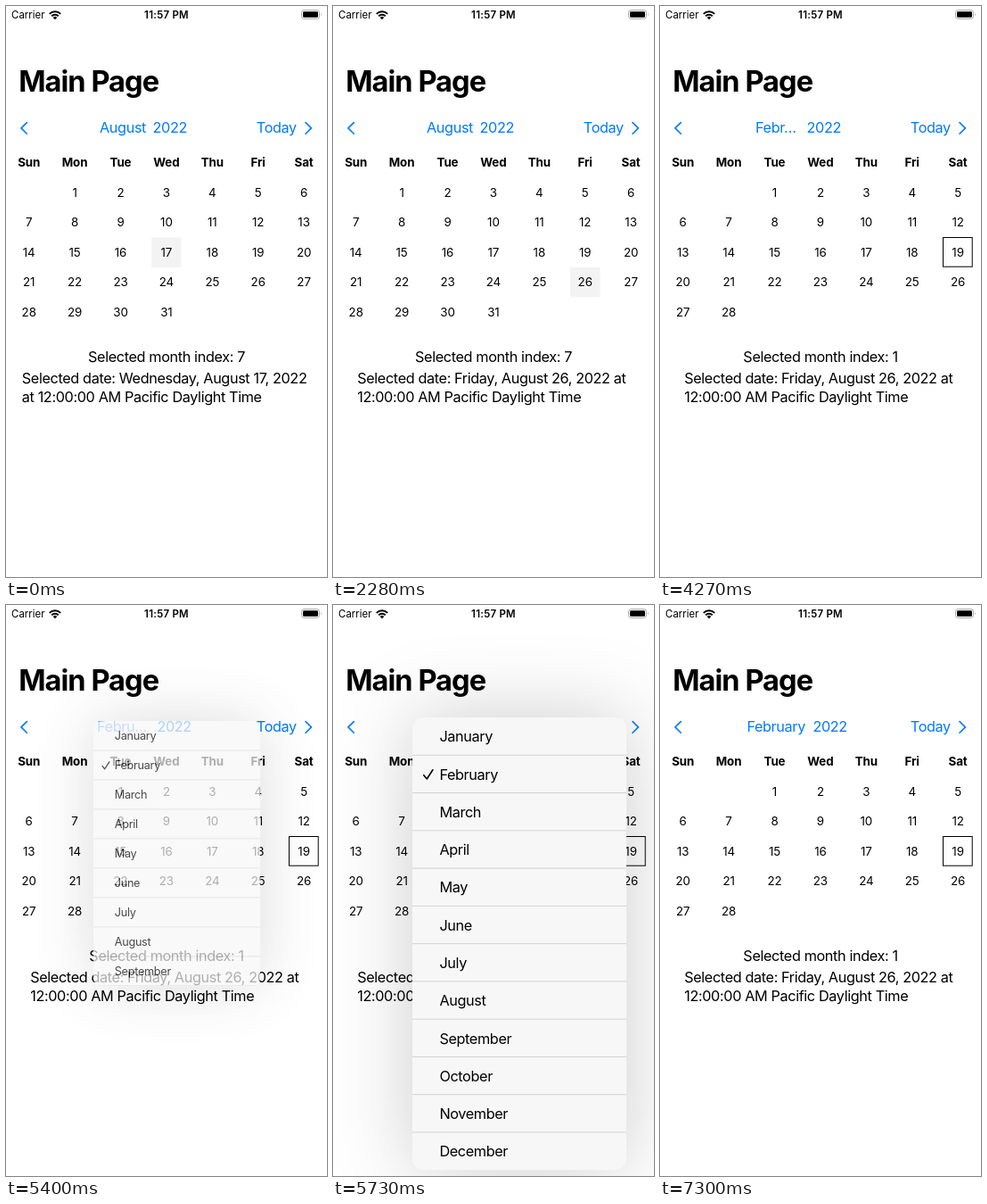
Write an HTML page that moves like this. It is 360 px wide and 640 px high and loops after 8 s.

```html
<!DOCTYPE html>
<html lang="en">
<head>
<meta charset="utf-8">
<title>Calendar</title>
<style>
html, body { margin: 0; width: 100%; height: 100%; overflow: hidden; background: #fff; }
svg { display: block; width: 360px; height: 640px; }
text { font: 400 16.3px Inter, "Liberation Sans", sans-serif; letter-spacing: -.0245em; white-space: pre; }
.mid { text-anchor: middle; }
.small { font-size: 13.4px; letter-spacing: -.01em; }
.head { font-weight: 700; }
.title { font-size: 32.6px; font-weight: 700; letter-spacing: -.03em; }
.bar { font-size: 11.5px; letter-spacing: 0; }
.clock { font-weight: 600; letter-spacing: .02em; }
.blue { fill: #007aff; }
.line { fill: none; stroke-width: 1.6; stroke-linecap: round; stroke-linejoin: round; }
</style>
</head>
<body>
<svg id="stage" viewBox="0 0 360 640" xmlns="http://www.w3.org/2000/svg">
  <defs>
    <filter id="soft" filterUnits="userSpaceOnUse" x="-200" y="-200" width="700" height="1000">
      <feGaussianBlur stdDeviation="45"/>
    </filter>
    <clipPath id="panelClip"><rect id="clipRect" width="240" rx="12.5"/></clipPath>
  </defs>
  <text class="bar" x="6" y="14">Carrier</text>
  <path class="line" stroke="#000" style="stroke-width:2;stroke-linecap:butt"
    d="M48.8 8.9a8.7 8.7 0 0 1 12.4 0M51.2 11.3a5.3 5.3 0 0 1 7.6 0"/>
  <path d="M55 15.2l-2.2-2.3a3.1 3.1 0 0 1 4.4 0z"/>
  <text class="bar clock mid" x="180" y="14">11:57 PM</text>
  <rect x="331.5" y="4.7" width="20" height="9.6" rx="2.7" fill="none" stroke="#a6a6a6"/>
  <rect x="333" y="6.2" width="17" height="6.6" rx="1.4"/>
  <path d="M353 7.8q1.6 1.7 0 3.4z" fill="#a6a6a6"/>
  <text class="title" x="14.2" y="96">Main Page</text>
  <path class="line" stroke="#007aff" d="M23.4 130.6l-6.4 6.3 6.4 6.3M336 130.6l6.4 6.3-6.4 6.3"/>
  <text class="blue" id="month" y="142"></text>
  <text class="blue" id="year" y="142">2022</text>
  <text class="blue" id="today" x="280.8" y="142">Today</text>
  <g id="week"></g>
  <g id="august"></g>
  <g id="february"></g>
  <text class="mid" id="index" x="180" y="398.5"></text>
  <text id="date1" y="423"></text>
  <text id="date2" y="444"></text>
  <g id="menu">
    <rect id="shadow" width="240" rx="12.5" fill="#000" fill-opacity=".2" filter="url(#soft)"/>
    <g clip-path="url(#panelClip)">
      <rect width="240" height="508" fill="#f7f7f7"/>
      <g id="rows"></g>
    </g>
  </g>
</svg>
<script>
const LOOP = 8000;
const ROW = 42.27;
const MENU = { x: 89, y: 126, h: 12 * ROW, px: 130, py: 144 };
const MONTHS = ["January", "February", "March", "April", "May", "June", "July",
  "August", "September", "October", "November", "December"];

const $ = id => document.getElementById(id);

function add(parent, tag, attrs, text) {
  const el = document.createElementNS("http://www.w3.org/2000/svg", tag);
  for (const k in attrs) el.setAttribute(k, attrs[k]);
  if (text !== undefined) el.textContent = text;
  parent.appendChild(el);
  return el;
}

const set = (id, attrs) => {
  for (const k in attrs) $(id).setAttribute(k, attrs[k]);
};
const colX = i => 25.7 + 51.4 * i;
const rowY = i => 209 + 33.5 * i;

// Cell of a day, given the weekday of the first of the month
const cell = (day, first) => {
  const n = day - 1 + first;
  return { x: colX(n % 7), y: rowY(Math.floor(n / 7)) };
};

function addDays(group, count, first) {
  for (let d = 1; d <= count; d++) {
    const c = cell(d, first);
    add(group, "text", { class: "small mid", x: c.x, y: c.y + 4.8 }, d);
  }
}

"Sun Mon Tue Wed Thu Fri Sat".split(" ").forEach((name, i) =>
  add($("week"), "text", { class: "small head mid", x: colX(i), y: 180 }, name));

const mark = add($("august"), "rect", { width: 33.5, height: 33.5, fill: "#f3f3f3" });
addDays($("august"), 31, 1);
addDays($("february"), 28, 2);
add($("february"), "rect", { x: 317.5, y: 259.5, width: 32.7, height: 32.7, fill: "none", stroke: "#000" });

MONTHS.forEach((name, i) => {
  const y = i * ROW;
  add($("rows"), "text", { x: 30.4, y: y + 27.4 }, name);
  if (i) add($("rows"), "path", { d: `M0 ${y}H240`, stroke: "#bbb", "stroke-width": .6 });
});
add($("rows"), "path", {
  class: "line", stroke: "#000", d: `M12.8 ${ROW + 22.4}l3.5 4.3 6.6-10.2`
});

const PICKS = [
  { at: 0, day: 17, x: 17.8, lines: ["Wednesday, August 17, 2022", "at 12:00:00 AM"] },
  { at: 500, day: 19, x: 27.2, lines: ["Friday, August 19, 2022 at", "12:00:00 AM"] },
  { at: 1380, day: 24, x: 15.4, lines: ["Wednesday, August 24, 2022", "at 12:00:00 AM"] },
  { at: 2280, day: 26, x: 27.2, lines: ["Friday, August 26, 2022 at", "12:00:00 AM"] }
];

// Progress 0..1 held on n evenly spaced moments, the last one at the end
function steps(t, from, to, n) {
  if (t < from) return 0;
  const k = Math.floor((t - from) / (to - from) * (n - 1) + 1e-6);
  return Math.min(n, k + 1) / n;
}

function drawDate(t) {
  const pick = PICKS.filter(p => t >= p.at).pop();
  const c = cell(pick.day, 1);
  mark.setAttribute("x", c.x - 16.75);
  mark.setAttribute("y", c.y - 16.75);
  set("date1", { x: pick.x });
  set("date2", { x: pick.x });
  $("date1").textContent = "Selected date: " + pick.lines[0];
  $("date2").textContent = pick.lines[1] + " Pacific Daylight Time";
}

function drawPages(t) {
  const u = steps(t, 3940, 4270, 4);
  const p = u * u * (3 - 2 * u);
  set("august", { transform: `translate(${360 * p} 0)`, visibility: p < 1 ? "visible" : "hidden" });
  set("february", { transform: `translate(${360 * (p - 1)} 0)`, visibility: p > 0 ? "visible" : "hidden" });
  set("today", { opacity: t < 3800 ? 1 : .2 + .8 * p });
  $("index").textContent = "Selected month index: " + (p > 0 ? 1 : 7);
}

function drawHeader(t) {
  const [name, mx, yx] =
    t < 3940 ? ["August", 105, 164.6] :
    t < 5170 ? ["Febr…", 107, 164.6] :
    t < 6850 ? ["Febru…", 102, 169.4] : ["February", 97.4, 171.4];
  $("month").textContent = name;
  set("month", { x: mx, opacity: t >= 5170 && t < 6850 ? .7 : 1 });
  set("year", { x: yx });
}

function drawMenu(t) {
  let e = 0;
  if (t < 6850) {
    const u = (steps(t, 5170, 5730, 6) * 6 - 1) / 5;
    if (u > 0) e = 1 - (1 - u) ** 2;
  } else {
    e = (1 - steps(t, 6850, 7300, 5)) ** 1.5;
  }
  const s = .39 + .61 * e;
  const h = MENU.h * (.31 + .69 * e);
  const x = MENU.px - (MENU.px - MENU.x) * s;
  const y = MENU.py - (MENU.py - MENU.y) * s;
  set("menu", {
    transform: `translate(${x} ${y}) scale(${s})`,
    opacity: Math.min(1, e * 1.1),
    visibility: e > 0 ? "visible" : "hidden"
  });
  set("clipRect", { height: h });
  set("shadow", { height: h });
}

function draw(t) {
  drawDate(t);
  drawPages(t);
  drawHeader(t);
  drawMenu(t);
}

const start = performance.now();
function tick() {
  draw((performance.now() - start) % LOOP);
  requestAnimationFrame(tick);
}
draw(0);
requestAnimationFrame(tick);
</script>
</body>
</html>
```
